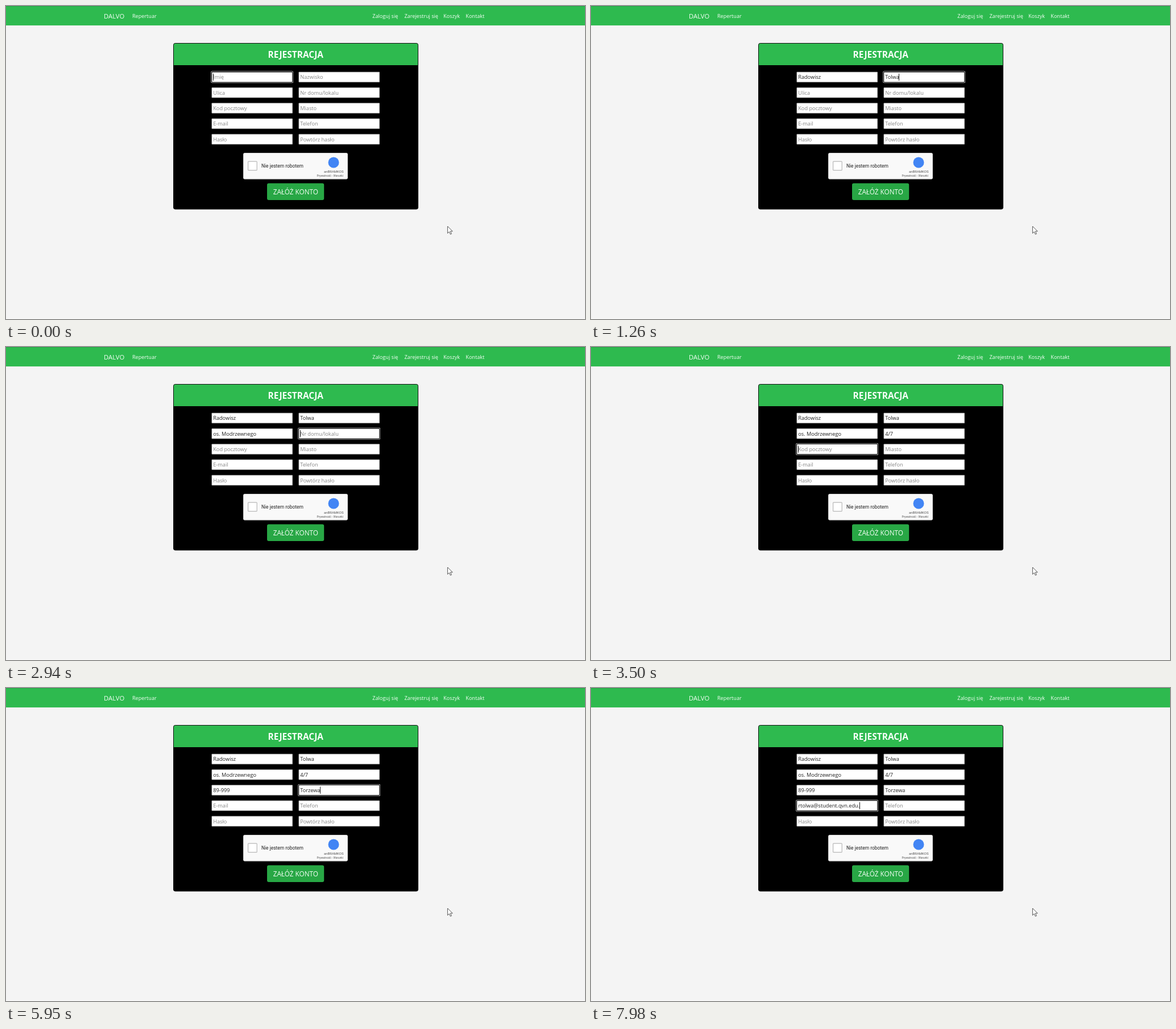
These frames come from a looping animation (1018x550 px, 8000 ms). An HTML page with a canvas:

```html
<!DOCTYPE html>
<html lang="pl">
<head>
<meta charset="utf-8">
<title>Rejestracja</title>
<style>
  html, body { margin: 0; width: 100%; height: 100%; overflow: hidden; background: #f4f4f4; }
  canvas { display: block; }
</style>
</head>
<body>
<canvas id="stage" width="1018" height="550"></canvas>
<script>
const ctx = document.getElementById('stage').getContext('2d');
const LOOP = 8000, TICK = 70;
const SANS = '"Open Sans", "Noto Sans", sans-serif';
const ROBOTO = 'Roboto, Arial, sans-serif';
const GREEN = '#2eba4f';

// Placeholder and typed value, in tab order
const fields = [
  ['Imię', 'Radowisz'], ['Nazwisko', 'Tolwa'],
  ['Ulica', 'os. Modrzewnego'], ['Nr domu/lokalu', '4/7'],
  ['Kod pocztowy', '89-999'], ['Miasto', 'Torzewa'],
  ['E-mail', 'rtolwa@student.qvn.edu.'], ['Telefon', ''],
  ['Hasło', ''], ['Powtórz hasło', '']
];

// Typing runs: field, focus or start time, first key, last key, length reached
const runs = [
  [0, 0, 70, 630, 8],
  [1, 770, 840, 1190, 5],
  [2, 1470, 1610, 2240, 9],
  [2, 2240, 2310, 2700, 15],
  [3, 2870, 3010, 3290, 3],
  [4, 3430, 3780, 4620, 6],
  [5, 5180, 5390, 5870, 7],
  [6, 6160, 6440, 7400, 13],
  [6, 7410, 7480, 7960, 23]
];

const keys = [];
for (const [field, focus, first, last, end] of runs) {
  const prev = keys[keys.length - 1];
  const start = prev && prev.field === field ? prev.count : 0;
  keys.push({ time: focus, field, count: start });
  for (let n = start + 1; n <= end; n++) {
    const part = (n - start - 1) / (end - start - 1);
    keys.push({ time: first + (last - first) * part, field, count: n });
  }
}

function text(str, x, y, size, color, { font = SANS, weight = 400, align = 'left' } = {}) {
  ctx.font = `${weight} ${size}px ${font}`;
  ctx.textAlign = align;
  ctx.fillStyle = color;
  ctx.fillText(str, x, y);
}

function rect(x, y, w, h, color) {
  ctx.fillStyle = color;
  ctx.fillRect(x, y, w, h);
}

function box(x, y, w, h, r, fill, stroke, line = 1) {
  ctx.beginPath();
  ctx.roundRect(x, y, w, h, r);
  ctx.fillStyle = fill;
  ctx.fill();
  if (stroke) {
    ctx.strokeStyle = stroke;
    ctx.lineWidth = line;
    ctx.stroke();
  }
}

function drawNav() {
  rect(0, 0, 1018, 34, GREEN);
  rect(0, 0, 1018, 1, '#2a9f48');
  rect(0, 34, 1018, 1, '#d5ecda');
  text('DALVO', 172, 22.2, 11.3, '#f4fff6');
  const links = [['Repertuar', 222], ['Zaloguj się', 644.3], ['Zarejestruj się', 700.4],
    ['Koszyk', 769], ['Kontakt', 808.3]];
  for (const [label, x] of links) text(label, x, 21.3, 9.1, '#f4fff6');
}

function drawCard() {
  box(294.5, 65.5, 430, 291.5, 3, '#000', '#111');
  box(295, 66, 429, 38, [2.5, 2.5, 0, 0], GREEN);
  text('REJESTRACJA', 509.3, 90.6, 15.5, '#f6fff8', { weight: 700, align: 'center' });
}

function drawCaptcha() {
  box(417.5, 258.5, 183, 45.5, 2, '#f9f9f9', '#d3d3d3');
  box(425.6, 273.1, 15.6, 15.6, 1, '#fff', '#b8b8b8', 1.2);
  text('Nie jestem robotem', 449, 284.2, 8.45, '#222', { font: ROBOTO });
  ctx.beginPath();
  ctx.arc(576, 275, 9.5, 0, Math.PI * 2);
  ctx.fillStyle = '#4285f4';
  ctx.fill();
  text('anBRAMKOS', 576.2, 292.5, 6, '#555', { font: ROBOTO, align: 'center' });
  text('Prywatność - Warunki', 593, 299.6, 4.85, '#555', { font: ROBOTO, align: 'right' });
}

function drawButton() {
  box(459, 311.5, 100.2, 29.5, 3, '#28a745');
  text('ZAŁÓŻ KONTO', 509.3, 330.8, 11.75, '#f4fff6', { align: 'center' });
}

function drawField(i, count, focused, caret) {
  const x = i % 2 ? 514.5 : 361.5;
  const y = 115.7 + Math.floor(i / 2) * 27.3;
  const [hint, value] = fields[i];
  if (focused) {
    box(x - 1.2, y - 1.2, 144.8, 20.8, 2, '#fff');
    box(x, y, 142.4, 18.4, 1, '#fff', '#111', 1.4);
  } else {
    box(x + 0.4, y + 0.4, 141.8, 17.6, 0.5, '#fff', '#a0a0a0', 0.8);
  }
  const shown = value.slice(0, count);
  text(shown || hint, x + 2.7, y + 12.7, 9.2, shown ? '#222' : '#858585');
  if (caret) {
    const end = shown ? ctx.measureText(shown).width : 0;
    rect(Math.round(x + 2.4 + end), y + 3, 1, 12.5, '#222');
  }
}

function drawCursor() {
  ctx.save();
  ctx.translate(776.4, 387);
  ctx.beginPath();
  for (const [x, y] of [[0, 0], [0, 12.4], [2.9, 9.7], [4.9, 14.2], [6.9, 13.3], [4.9, 8.9], [8.8, 8.9]]) {
    ctx.lineTo(x, y);
  }
  ctx.closePath();
  ctx.fillStyle = '#fff';
  ctx.fill();
  ctx.strokeStyle = '#444';
  ctx.lineWidth = 0.9;
  ctx.stroke();
  ctx.restore();
}

function draw(time) {
  const t = Math.floor(time / TICK) * TICK;
  const counts = fields.map(() => 0);
  let current = keys[0];
  for (const key of keys) {
    if (key.time > t) break;
    counts[key.field] = key.count;
    current = key;
  }
  const caretOn = (t - current.time) % 1000 < 500;

  rect(0, 0, 1018, 550, '#f4f4f4');
  rect(0, 549, 1018, 1, '#fbfbfb');
  drawNav();
  drawCard();
  fields.forEach((_, i) => {
    const focused = i === current.field;
    drawField(i, counts[i], focused, focused && caretOn);
  });
  drawCaptcha();
  drawButton();
  drawCursor();
}

const begin = performance.now();
function frame() {
  draw((performance.now() - begin) % LOOP);
  requestAnimationFrame(frame);
}
frame();
</script>
</body>
</html>
```
